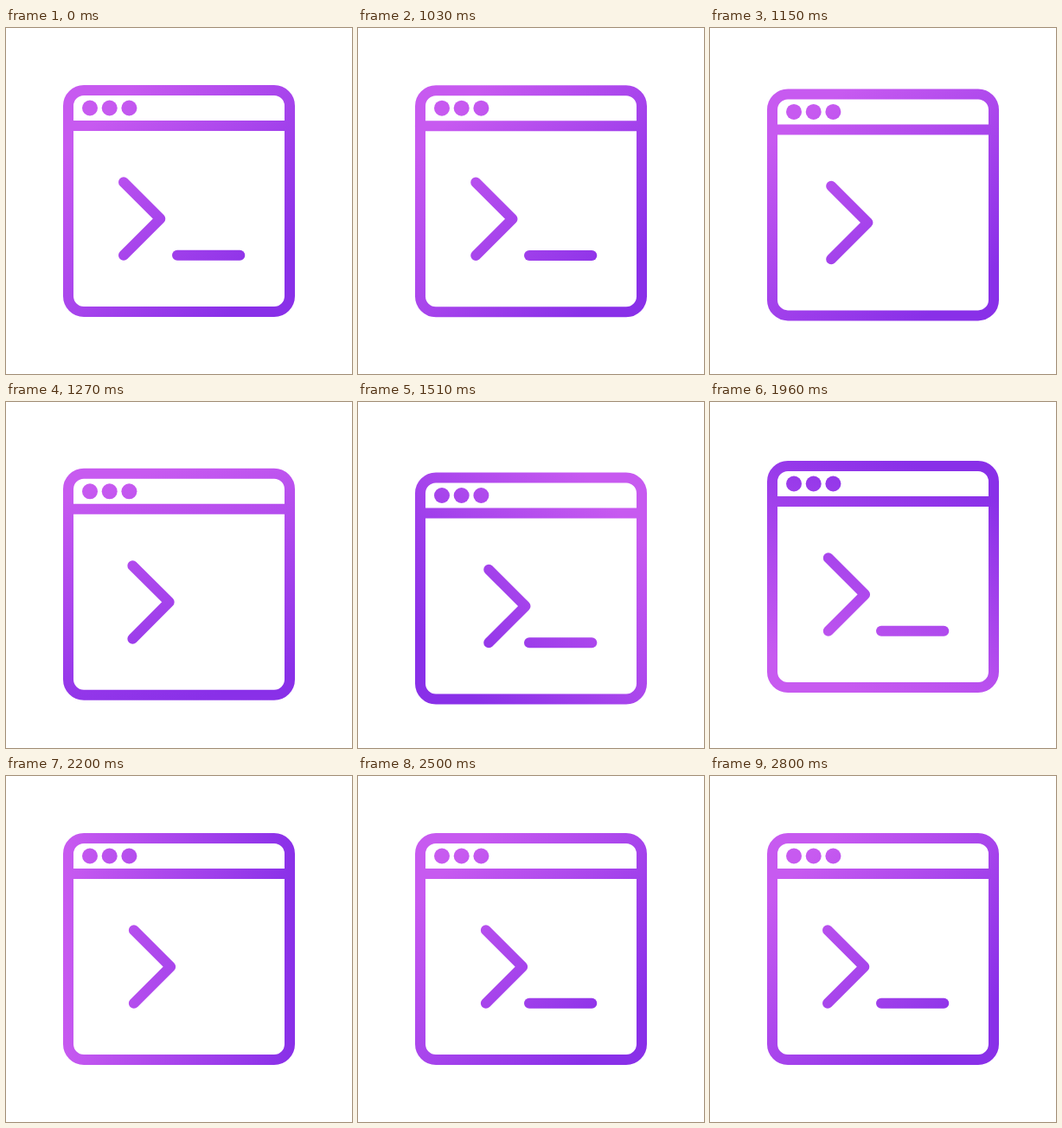
Animation, 400 px wide and 400 px high, one loop 2860 ms. Source, as an HTML page with a canvas:

```html
<!DOCTYPE html>
<html lang="en">
<head>
<meta charset="utf-8">
<title>Terminal icon</title>
<style>
html, body { margin: 0; width: 100%; height: 100%; overflow: hidden; background: #fff; }
canvas { display: block; width: 400px; height: 400px; }
</style>
</head>
<body>
<canvas id="stage" width="400" height="400"></canvas>
<script>
const ctx = document.getElementById('stage').getContext('2d');
const LOOP = 2860, STEP = 30, START = 1000, NUDGE = 900;
const LIGHT = '#c75af0', DARK = '#8930e8';

const clamp = v => Math.min(1, Math.max(0, v));
const smooth = u => u * u * (3 - 2 * u);

// Eased progress with handles (x1, 0) and (x2, 1)
function ease(u, x1, x2) {
  let lo = 0, hi = 1;
  for (let i = 0; i < 24; i++) {
    const s = (lo + hi) / 2, r = 1 - s;
    const x = 3 * s * r * r * x1 + 3 * s * s * r * x2 + s * s * s;
    if (x < u) lo = s; else hi = s;
  }
  return smooth(lo);
}

function dropAt(t) {
  if (t <= 1000 || t >= 2200) return 0;
  return t < 1450
    ? 16 * ease((t - 1000) / 450, 0.333, 0.62)
    : 16 * (1 - ease((t - 1450) / 750, 0.26, 0.44));
}

// The prompt is nudged to the right twice
function nudgeAt(t) {
  const p = t - START;
  if (p <= 0 || p >= 2 * NUDGE) return 0;
  const u = (p % NUDGE) / (NUDGE / 2);
  return 16 * smooth(u < 1 ? u : 2 - u);
}

function cursorOn(t) {
  const p = t - START;
  if (p < 0 || p >= 2 * NUDGE) return true;
  const q = p % NUDGE;
  return q < 150 || q >= 450;
}

function paint(t) {
  const angle = Math.PI / 4 + 2 * Math.PI * smooth(clamp((t - START) / 1530));
  const gx = 134 * Math.cos(angle), gy = 134 * Math.sin(angle);
  return [[0, LIGHT], [1, DARK]].reduce((g, [pos, color]) => {
    g.addColorStop(pos, color);
    return g;
  }, ctx.createLinearGradient(200 - gx, 200 - gy, 200 + gx, 200 + gy));
}

function line(...pts) {
  ctx.beginPath();
  pts.forEach(([x, y]) => ctx.lineTo(x, y));
  ctx.stroke();
}

function draw(t) {
  ctx.fillStyle = '#fff';
  ctx.fillRect(0, 0, 400, 400);
  ctx.save();
  ctx.translate(0, dropAt(t));
  ctx.fillStyle = ctx.strokeStyle = paint(t);
  ctx.lineWidth = 12;
  ctx.lineCap = ctx.lineJoin = 'round';

  ctx.beginPath();
  ctx.roundRect(72, 72, 256, 256, 18);
  ctx.stroke();
  line([72, 113], [328, 113]);
  for (const x of [97, 119.7, 142.4]) {
    ctx.beginPath();
    ctx.arc(x, 92.5, 9, 0, 2 * Math.PI);
    ctx.fill();
  }

  const dx = nudgeAt(t);
  line([136 + dx, 178.3], [178.3 + dx, 220.5], [136 + dx, 262.8]);
  if (cursorOn(t)) line([198, 262.8], [270.3, 262.8]);
  ctx.restore();
}

const begin = performance.now();
function tick() {
  const t = (performance.now() - begin) % LOOP;
  draw(Math.floor((t - 10) / STEP) * STEP + 10);
  requestAnimationFrame(tick);
}
tick();
</script>
</body>
</html>
```
